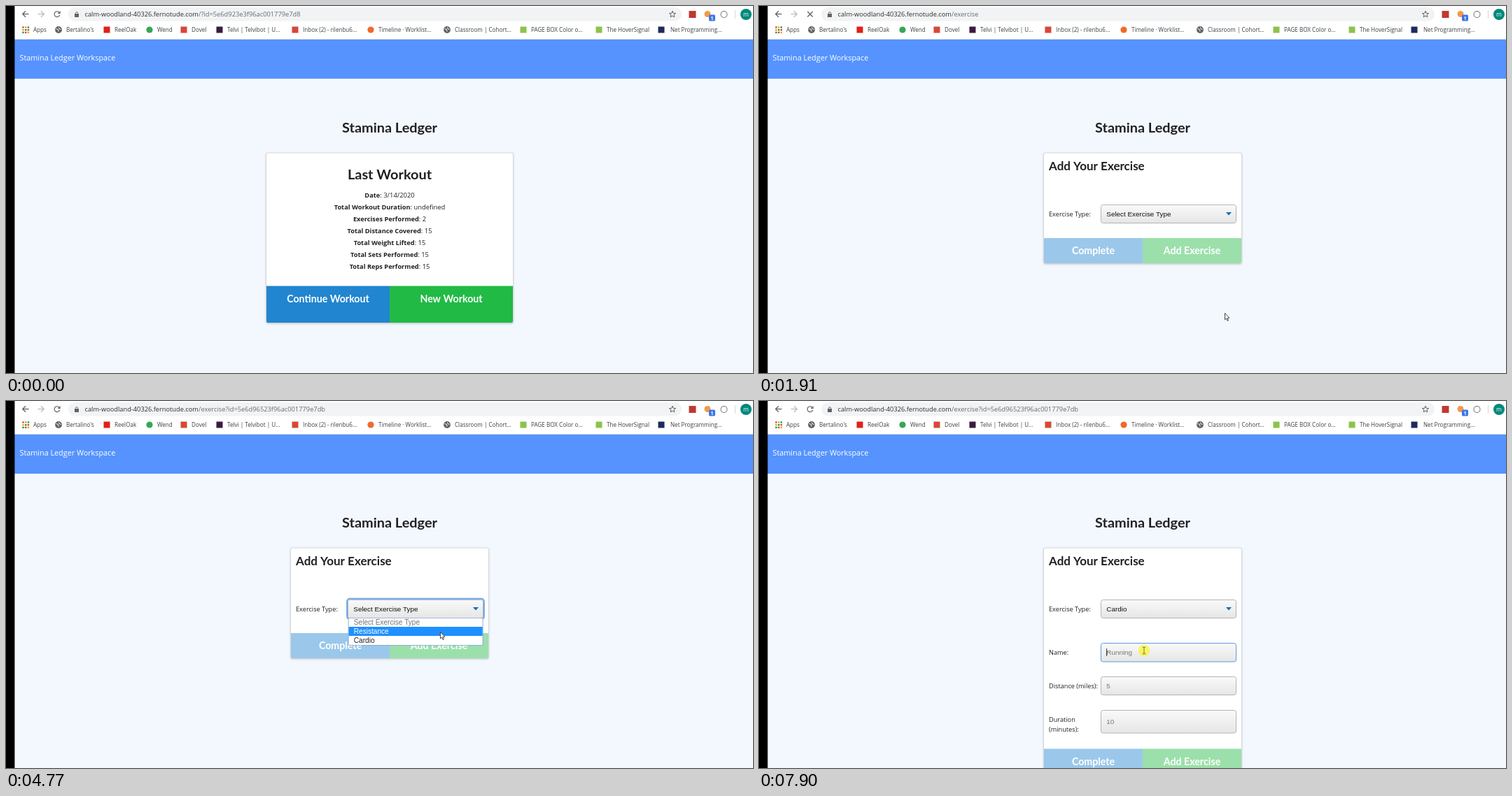
An HTML page with a canvas for the animation above (8 s loop, 1067 px wide and 525 px high).

```html
<!DOCTYPE html>
<html lang="en">
<head>
<meta charset="utf-8">
<title>Stamina Ledger</title>
<style>
html, body { margin: 0; width: 100%; height: 100%; overflow: hidden; background: #f3f8ff; }
canvas { display: block; }
</style>
</head>
<body>
<canvas id="stage" width="1067" height="525"></canvas>
<script>
const ctx = document.getElementById('stage').getContext('2d');
const LOOP = 8000;
const UI = '"Open Sans", "Noto Sans", sans-serif';
const HEAD = 'Lato, sans-serif';
const FORM = '"Liberation Sans", Arial, sans-serif';
const INK = '#212121', GREY = '#5f6368';

// Event times in ms
const PRESS = 1450, LOADING = 1680, PAGE = 1910, LOADED = 2060;
const OPEN = 3910, FOCUS = 3840, CHOSEN = 5950, NAME_FOCUS = 7840;

// Pointer moves: start, end, number of steps, waypoints
const START = [992, 499];
const MOVES = [
  [600, 750, 3, [[743, 438]]],
  [980, 1300, 5, [[700, 446], [598, 416], [665, 439]]],
  [2610, 3380, 11, [[655, 380], [667, 319]]],
  [3450, 3680, 4, [[667, 310], [669, 304], [669, 299], [669, 301]]],
  [4400, 5160, 11, [[615, 333], [613, 332]]],
  [5230, 5390, 3, [[608, 337]]],
  [6500, 7270, 11, [[600, 310], [559, 338], [561, 332]]],
  [7340, 7650, 5, [[550, 357]]]
];
// Click highlights: start, end, opacity
const CLICKS = [[1450, 1760, .55], [3840, 4080, .75], [5730, 5950, .75], [7840, 8000, .75]];

function pointerAt(t) {
  let from = START, pos = null;
  for (const [t0, t1, n, pts] of MOVES) {
    if (t < t0) break;
    const step = Math.min(n - 1, Math.floor((t - t0) / ((t1 - t0) / (n - 1)) + 1e-6));
    const path = [from, ...pts];
    const u = (step + 1) / n * pts.length;
    const i = Math.min(pts.length - 1, Math.floor(u));
    const f = u - i;
    pos = [0, 1].map(k => path[i][k] + (path[i + 1][k] - path[i][k]) * f);
    from = pts[pts.length - 1];
  }
  return pos;
}

function text(str, x, y, font, color, align = 'left') {
  ctx.font = font;
  ctx.fillStyle = color;
  ctx.textAlign = align;
  ctx.fillText(str, x, y);
}

function rect(x, y, w, h, color) {
  ctx.fillStyle = color;
  ctx.fillRect(x, y, w, h);
}

function round(x, y, w, h, r) {
  ctx.beginPath();
  ctx.roundRect(x, y, w, h, r);
}

function disc(x, y, r, color) {
  ctx.beginPath();
  ctx.arc(x, y, r, 0, 7);
  ctx.fillStyle = color;
  ctx.fill();
}

function line(color, width, ...pts) {
  ctx.beginPath();
  pts.forEach(([x, y]) => ctx.lineTo(x, y));
  ctx.strokeStyle = color;
  ctx.lineWidth = width;
  ctx.stroke();
}

function shape(x, y, pts, fill, stroke) {
  ctx.beginPath();
  pts.forEach(([px, py]) => ctx.lineTo(x + px, y + py));
  ctx.closePath();
  ctx.fillStyle = fill;
  ctx.fill();
  if (stroke) {
    ctx.strokeStyle = stroke;
    ctx.lineWidth = .9;
    ctx.stroke();
  }
}

function globe(x, y) {
  disc(x, y, 4.9, GREY);
  line('#fff', 1, [x - 3.5, y - 1.5], [x - .5, y - .5], [x, y + 2.5]);
  line('#fff', 1, [x + .5, y - 3.5], [x + 1, y - 1.5], [x + 3.5, y - .5]);
}

function backArrow(x, dir, color) {
  line(color, 1.3, [x + 4.5 * dir, 11.5], [x - 4 * dir, 11.5]);
  line(color, 1.3, [x, 7.2], [x - 4.3 * dir, 11.5], [x, 15.8]);
}

function reloadIcon(t) {
  if (t >= LOADING && t < LOADED) {
    line(GREY, 1.4, [69.3, 8], [76.7, 15.4]);
    line(GREY, 1.4, [76.7, 8], [69.3, 15.4]);
    return;
  }
  ctx.beginPath();
  ctx.arc(73, 11.7, 3.9, .35, 5.4);
  ctx.strokeStyle = GREY;
  ctx.lineWidth = 1.3;
  ctx.stroke();
  shape(73, 7, [[4.6, 0], [4.6, 4], [.6, 4]], GREY);
}

function star(x, y) {
  ctx.beginPath();
  for (let i = 0; i < 10; i++) {
    const a = i * Math.PI / 5 - Math.PI / 2, r = i % 2 ? 2.1 : 4.8;
    ctx.lineTo(x + r * Math.cos(a), y + r * Math.sin(a));
  }
  ctx.closePath();
  ctx.strokeStyle = GREY;
  ctx.lineWidth = 1;
  ctx.stroke();
}

function lock(x, y) {
  rect(x - 3, y - 1, 6, 5, GREY);
  ctx.beginPath();
  ctx.arc(x, y - 1.5, 1.8, Math.PI, 0);
  ctx.strokeStyle = GREY;
  ctx.lineWidth = 1;
  ctx.stroke();
}

// Bookmarks: label, label x, icon x, icon kind, icon colour
const BOOKMARKS = [
  ['Apps', 39, 28, 'grid'],
  ["Bertalino's", 86, 75, 'globe'],
  ['ReelOak', 155, 144, 'square', '#e0211b'],
  ['Wend', 216, 205, 'disc', '#34a853'],
  ['Dovel', 265, 254, 'square', '#d5483b'],
  ['Telvi | Telvibot | U...', 316, 305, 'square', '#3b1a40'],
  ['Inbox (2) - rilenbu6...', 424, 413, 'square', '#d5483b'],
  ['Timeline · Worklist...', 532, 521, 'disc', '#ee6a2c'],
  ['Classroom | Cohort...', 641, 630, 'globe'],
  ['PAGE BOX Color o...', 750, 739, 'square', '#8bc34a'],
  ['The HoverSignal', 858, 847, 'square', '#8bc34a'],
  ['Net Programming...', 949, 936, 'square', '#1f2a5c']
];

function bookmark([label, x, ix, kind, color]) {
  const y = 34;
  if (kind === 'globe') globe(ix, y);
  else if (kind === 'disc') disc(ix, y, 4.6, color);
  else if (kind === 'square') rect(ix - 4.5, y - 4.5, 9, 9, color);
  else {
    const hues = ['#db4437', '#f4a100', '#0f9d58'];
    for (let i = 0; i < 9; i++)
      rect(ix - 4.7 + i % 3 * 3.7, y - 4.7 + Math.floor(i / 3) * 3.7, 2.4, 2.4, hues[(i % 3 + Math.floor(i / 3)) % 3]);
  }
  text(label, x, 37, `8.1px ${UI}`, '#3c4043');
}

function browser(t) {
  rect(0, 0, 1067, 47, '#fff');
  rect(0, 47, 1067, 1, '#dadce0');
  round(89, 2, 876, 19.5, 9.7);
  ctx.fillStyle = '#f1f3f4';
  ctx.fill();
  backArrow(28, 1, GREY);
  backArrow(50, -1, '#b9bcbf');
  reloadIcon(t);
  lock(101, 12);
  const path = t < PAGE ? '/?id=5e6d923e3f96ac001779e7d8'
    : t < LOADED ? '/exercise' : '/exercise?id=5e6d96523f96ac001779e7db';
  text('calm-woodland-40326.fernotude.com', 112.5, 15.2, `9.25px ${UI}`, '#2c2e31');
  text(path, 275, 15.2, `9.3px ${UI}`, '#686c71');
  star(952, 12);
  rect(975.5, 7, 10, 10, '#c0392f');
  disc(1002, 11.5, 4.5, '#f39a4a');
  round(1004, 12.5, 9, 9, 1.5);
  ctx.fillStyle = '#3b78e7';
  ctx.fill();
  text('1', 1008.5, 19.8, `bold 7px ${UI}`, '#fff', 'center');
  disc(1025.5, 12, 5, '#6d7175');
  disc(1025.5, 12, 4, '#fff');
  line('#d5d7da', 1, [1041.5, 6], [1041.5, 18]);
  disc(1057, 12, 8, '#00897b');
  text('m', 1057, 14.7, `8.5px ${UI}`, '#fff', 'center');
  BOOKMARKS.forEach(bookmark);
}

function card(x, y, w, h) {
  ctx.save();
  ctx.shadowColor = 'rgba(130,135,140,.45)';
  ctx.shadowBlur = 2.5;
  ctx.shadowOffsetY = .8;
  round(x - .7, y - .7, w + 1.4, h + 1.4, 3);
  ctx.fillStyle = '#d4d4d5';
  ctx.fill();
  ctx.restore();
  round(x, y, w, h, 2.6);
  ctx.fillStyle = '#fff';
  ctx.fill();
}

function buttons(x, y, w, h, colors, labels, base) {
  const half = w / 2;
  labels.forEach((label, i) => {
    round(x + half * i, y, half, h, i ? [0, 0, 2.6, 0] : [0, 0, 0, 2.6]);
    ctx.fillStyle = colors[i];
    ctx.fill();
    text(label, x + half * (i + .5), base, `bold 14.2px ${HEAD}`, '#fff', 'center');
  });
}

function stat(label, value, i) {
  const bold = `bold 9.25px ${UI}`, plain = `9.4px ${UI}`, y = 273.6 + i * 17.13;
  ctx.font = bold;
  const lw = ctx.measureText(label).width;
  ctx.font = plain;
  const x = 548 - (lw + ctx.measureText(': ' + value).width) / 2;
  text(label, x, y, bold, INK);
  text(': ' + value, x + lw, y, plain, INK);
}

function summary(t) {
  card(372, 210.5, 352, 242.5);
  text('Last Workout', 548, 248, `bold 19.9px ${HEAD}`, INK, 'center');
  [['Date', '3/14/2020'], ['Total Workout Duration', 'undefined'], ['Exercises Performed', 2],
   ['Total Distance Covered', 15], ['Total Weight Lifted', 15], ['Total Sets Performed', 15],
   ['Total Reps Performed', 15]].forEach(([k, v], i) => stat(k, v, i));
  const green = t >= PRESS && t < 1760 ? '#198f35' : '#21ba45';
  buttons(372, 400.5, 352, 52.5, ['#2185d0', green], ['Continue Workout', 'New Workout'], 424);
}

function field(y, h, str, color, border = '#b4b4b4') {
  const g = ctx.createLinearGradient(0, y, 0, y + h);
  g.addColorStop(0, '#fafafa');
  g.addColorStop(1, '#e5e5e5');
  round(488.5, y + .5, 193, h - 1, 3);
  ctx.fillStyle = g;
  ctx.fill();
  ctx.strokeStyle = border;
  ctx.lineWidth = 1;
  ctx.stroke();
  text(str, 496.3, y + h / 2 + 3.4, `9.9px ${FORM}`, color);
}

function label(str, y) {
  text(str, 414, y, `9.2px ${UI}`, INK);
}

function dropdown(hover) {
  rect(488.7, 310, 192.8, 39.7, '#7d9bd6');
  rect(489.5, 310.7, 191.2, 38.3, '#fff');
  ['Select Exercise Type', 'Resistance', 'Cardio'].forEach((name, i) => {
    const y = 310 + i * 13;
    if (i === hover) rect(489.5, y, 191.2, 13, '#1e90ff');
    text(name, 496.8, y + 9.5, `10.1px ${FORM}`, i === hover ? '#fff' : i ? '#222' : '#757575');
  });
}

function exerciseForm(t, pos) {
  const chosen = t >= CHOSEN;
  const top = chosen ? 497.5 : 332;
  card(407, 210.5, 282, top + 36 - 210.5);
  text('Add Your Exercise', 414, 234.5, `bold 17.05px ${HEAD}`, INK);
  label('Exercise Type:', 301.3);
  if (t >= FOCUS && t < NAME_FOCUS) {
    round(487.2, 282.7, 195.6, 29.6, 4);
    ctx.strokeStyle = '#65a5ea';
    ctx.lineWidth = 2;
    ctx.stroke();
  }
  field(284, 27, chosen ? 'Cardio' : 'Select Exercise Type', '#111');
  shape(671, 295, [[-4, 0], [4, 0], [0, 4.6]], '#0b70b5');
  if (chosen) {
    const active = t >= NAME_FOCUS;
    label('Name:', 363);
    label('Distance (miles):', 411.3);
    label('Duration', 459.3);
    label('(minutes):', 472.6);
    field(346, 27.5, 'Running', '#757575', active ? '#5b97e0' : undefined);
    field(394, 27, '5', '#757575');
    field(442, 33.5, '10', '#757575');
    if (active) line('#222', .9, [496.6, 354], [496.6, 365]);
  }
  buttons(407, top, 282, 36, ['#9bc8ea', '#9be0ab'], ['Complete', 'Add Exercise'], top + 23.3);
  if (t >= OPEN && !chosen)
    dropdown(pos[1] > 336 ? 2 : pos[1] >= 323 ? 1 : -1);
}

function pointer(t, [x, y]) {
  for (const [t0, t1, alpha] of CLICKS)
    if (t >= t0 && t < t1) disc(x, y, 8.3, `rgba(252,246,50,${alpha})`);
  if (t < PAGE && x > 548 && x < 724 && y > 400 && y < 453) {
    shape(x, y, [[-.9, .4], [.2, -.3], [1.2, .5], [1.3, 4], [4.6, 5], [5.4, 6], [4.6, 11.5],
      [-.2, 11.5], [-3, 7.4], [-2.6, 6.4], [-.9, 7.6]], '#fff', '#222');
  } else if (t >= CHOSEN && y > 346 && x > 488) {
    line('#555', .8, [x, y - 4.5], [x, y + 4.5]);
    for (const s of [-1, 1])
      line('#555', .8, [x - 2.3, y + 5 * s], [x, y + 4.4 * s], [x + 2.3, y + 5 * s]);
  } else {
    shape(x + .5, y + .5, [[0, 0], [0, 9.3], [2.1, 7.4], [3.6, 10.9], [5, 10.3], [3.6, 6.9], [6.4, 6.7]], '#fff', '#333');
  }
}

function draw(t) {
  const pos = pointerAt(t);
  rect(0, 0, 1067, 525, '#f3f8ff');
  browser(t);
  rect(0, 48, 1067, 56, '#5693ff');
  text('Stamina Ledger Workspace', 19.5, 77.7, `10.8px ${UI}`, '#fff');
  text('Stamina Ledger', 548, 181, `bold 19.9px ${HEAD}`, INK, 'center');
  if (t < PAGE) summary(t);
  else exerciseForm(t, pos);
  rect(0, 0, 12.4, 525, '#000');
  if (pos) pointer(t, pos);
}

function tick() {
  draw(performance.now() % LOOP);
  requestAnimationFrame(tick);
}
tick();
</script>
</body>
</html>
```
